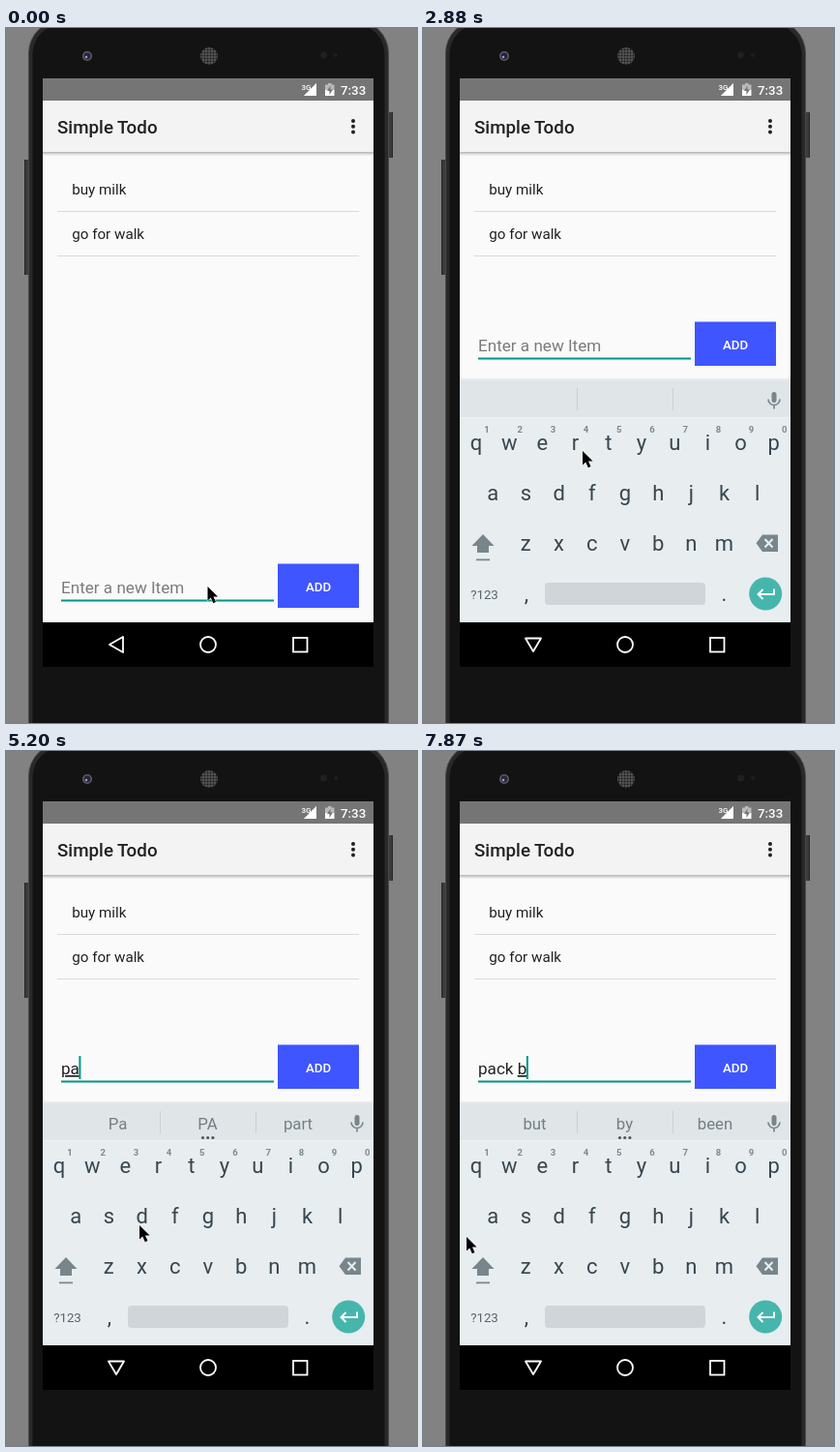
An HTML page for the animation above (8 s loop, 425x718 px).

```html
<!DOCTYPE html>
<html lang="en">
<head>
<meta charset="utf-8">
<title>Todo list</title>
<style>
  html, body { margin: 0; width: 100%; height: 100%; overflow: hidden; background: #828282; }
  svg { display: block; width: 100%; height: 100%; }
  text { font-family: Roboto, sans-serif; white-space: pre; }
  .mid { text-anchor: middle; }
  .medium { font-weight: 500; }
  .key { font-size: 22px; fill: #37474f; }
  .hint { font-size: 9.5px; font-weight: 700; fill: #7c898f; }
  .word { font-size: 16.8px; fill: #737f84; }
  .entry { font-size: 17.1px; fill: #212121; }
  #composing { text-decoration: underline; text-decoration-skip-ink: none; text-decoration-thickness: 1px; }
</style>
</head>
<body>
<svg viewBox="0 0 425 718" preserveAspectRatio="none">
  <defs>
    <linearGradient id="shade" x2="0" y2="1">
      <stop stop-color="#000" stop-opacity=".28"/>
      <stop offset="1" stop-color="#000" stop-opacity="0"/>
    </linearGradient>
    <pattern id="mesh" width="3" height="3" patternUnits="userSpaceOnUse">
      <rect width="3" height="3" fill="#555"/>
      <circle cx="1.5" cy="1.5" r="1" fill="#191919"/>
    </pattern>
    <filter id="soft" x="-20%" y="-20%" width="140%" height="140%">
      <feDropShadow dx="0" dy="1" stdDeviation="1.2" flood-opacity=".5"/>
    </filter>
  </defs>

  <!-- Phone body -->
  <rect width="425" height="718" fill="#828282"/>
  <path d="M19 136h5v119h-5zM395 87h5v47h-5z" fill="#3c3c3c"/>
  <path d="M19.5 136v119M399.5 87v47" stroke="#222"/>
  <rect x="23.5" y="-8" width="372" height="800" rx="34" fill="#292929" stroke="#484848"/>
  <rect x="27.5" y="-4" width="364" height="800" rx="31" fill="#131313"/>
  <circle cx="84" cy="29" r="5" fill="#5d5d62"/>
  <circle cx="84" cy="29" r="3.4" fill="#25253c"/>
  <circle cx="83" cy="30" r="1.3" fill="#9a9ad0"/>
  <circle cx="210" cy="29" r="9" fill="url(#mesh)"/>
  <circle cx="328.500" cy="28" r="3.5" fill="#202020"/>
  <circle cx="341" cy="28" r="2" fill="#202020"/>

  <!-- App screen -->
  <rect x="38" y="52" width="342" height="562" fill="#fafafa"/>
  <rect x="38" y="52" width="342" height="23" fill="#757575"/>
  <rect x="38" y="75" width="342" height="53" fill="#f3f3f3"/>
  <rect x="38" y="128" width="342" height="4" fill="url(#shade)"/>
  <g fill="#fff">
    <text x="305.500" y="63.500" font-size="8" class="medium">3G</text>
    <path d="M321 57v13h-13z" fill-opacity=".45"/>
    <path d="M316 62v8h-8z"/>
    <path d="M316 62l5-5v13h-5z"/>
    <path d="M330 58.500h3v-1.500h3.500v1.500h3v5.500h-9.500z" fill-opacity=".5"/>
    <path d="M330 64h9.500v6h-9.500z"/>
    <path d="M335.500 59.500l-3.500 5.500h2.500v4l3.500-5.500h-2.500z" fill="#757575"/>
    <text x="346" y="68.500" font-size="13.300" class="medium">7:33</text>
  </g>
  <text x="53" y="108.500" font-size="18.800" class="medium" fill="#212121">Simple Todo</text>
  <g fill="#212121">
    <circle cx="359" cy="96" r="2"/><circle cx="359" cy="101.700" r="2"/><circle cx="359" cy="107.400" r="2"/>
  </g>
  <g font-size="15.200" fill="#212121">
    <text x="68.200" y="172">buy milk</text>
    <text x="68.200" y="218">go for walk</text>
  </g>
  <path d="M53 189.500h312M53 235.500h312" stroke="#dadada"/>

  <g id="form">
    <text id="placeholder" class="entry" x="57" y="584" style="fill:#7b7b7b">Enter a new Item</text>
    <text id="entry" class="entry" x="57" y="584"><tspan id="done"></tspan><tspan id="composing"></tspan></text>
    <rect x="57" y="590.500" width="220" height="2" fill="#009688"/>
    <rect id="caret" y="565" width="2" height="24" fill="#009688"/>
    <rect x="281" y="553.500" width="84" height="45.500" fill="#3f55ff"/>
    <text x="323" y="581.500" font-size="13.300" class="mid medium" fill="#fff">ADD</text>
  </g>

  <rect x="38" y="614" width="342" height="46" fill="#000"/>

  <g id="keyboard">
    <rect x="38" y="362" width="342" height="3" fill="#000" opacity=".06"/>
    <rect x="38" y="364" width="342" height="250" fill="#e8edf0"/>
    <rect x="38" y="364" width="342" height="38" fill="#e0e5e8"/>
    <path d="M38 402.500h342" stroke="#f1f4f5"/>
    <path d="M159.500 372v23M258.500 372v23" stroke="#cad0d3"/>
    <g id="words">
      <text class="mid word" x="115.500" y="391"></text>
      <text class="mid word" x="208.500" y="391"></text>
      <text class="mid word" x="302" y="391"></text>
      <g id="more" fill="#4b575c">
        <circle cx="203.500" cy="399.500" r="1.600"/><circle cx="208.700" cy="399.500" r="1.600"/><circle cx="213.900" cy="399.500" r="1.600"/>
      </g>
    </g>
    <g fill="none" stroke="#78868c" stroke-width="1.700">
      <path d="M357 383.500a6 6 0 0 0 12 0M363 389.500v4"/>
      <rect x="360.500" y="376" width="5" height="11" rx="2.500" fill="#78868c" stroke="none"/>
    </g>
    <g id="letters"></g>
    <path d="M62 523l11.500 12h-5.500v7h-12v-7h-5.500zM55 548.500h14v1.800h-14z" fill="#78868c"/>
    <path d="M351 523.500h16v17.500h-16l-6.500-8.700z" fill="#78868c"/>
    <path d="M353.500 528l8 8.500M361.500 528l-8 8.500" stroke="#e8edf0" stroke-width="2"/>
    <text x="63.500" y="589.500" class="mid" font-size="13.300" fill="#56646a">?123</text>
    <text x="107" y="592" class="mid key">,</text>
    <text x="311.500" y="592" class="mid key">.</text>
    <rect id="space" x="126" y="573" width="166" height="23" rx="4"/>
    <circle cx="354.200" cy="584.500" r="17" fill="#46b6ac"/>
    <path d="M363 579.500v5.500h-16M351.500 580l-5 5 5 5" fill="none" stroke="#fff" stroke-width="1.900"/>
  </g>

  <g fill="none" stroke="#fff" stroke-width="1.800">
    <path id="back" stroke-linejoin="round"/>
    <circle cx="209" cy="637" r="8"/>
    <rect x="297" y="630" width="14.500" height="14.500"/>
  </g>

  <g id="popup">
    <rect x="-23" width="46" height="109" rx="2" fill="#cfd6d8" filter="url(#soft)"/>
    <text id="popupLetter" class="mid" y="39.500" font-size="32" fill="#37474f"></text>
    <path id="popupDots" d="M9 51.500h12" stroke="#7c898f" stroke-width="1.500" stroke-dasharray="2 2.500"/>
  </g>

  <path id="pointer" d="M0 0v14.500l3.300-3 2.500 5.700 2.700-1.200-2.500-5.500h4.600z" fill="#000" stroke="#fff" stroke-width="1" paint-order="stroke"/>
</svg>
<script>
const LOOP = 8000, KEYBOARD_AT = 1800, BLINK = 510, KEY_STEP = 34.2;
const $ = id => document.getElementById(id);
const rows = [["qwertyuiop", 55, 436], ["asdfghjkl", 72.2, 488], ["zxcvbnm", 106.3, 540]];
const keys = {};

function addText(parent, className, x, y, content) {
  const node = document.createElementNS("http://www.w3.org/2000/svg", "text");
  node.setAttribute("class", "mid " + className);
  node.setAttribute("x", x);
  node.setAttribute("y", y);
  node.textContent = content;
  parent.append(node);
}

rows.forEach(([letters, left, baseline], row) => [...letters].forEach((letter, i) => {
  const x = left + KEY_STEP * i;
  keys[letter] = { x, y: baseline };
  addText($("letters"), "key", x, baseline, letter);
  if (row === 0) addText($("letters"), "hint", x + 11, 418, (i + 1) % 10);
}));

// [time, x, y] of the pointer tip
const path = [
  [90, 208.5, 577], [300, 185, 547], [540, 155, 566], [720, 155, 566], [810, 153.5, 569],
  [1960, 153.5, 569], [2520, 152, 468], [2610, 152, 466], [2880, 165, 437], [3330, 202, 463],
  [3860, 358, 431], [4220, 358, 431], [4720, 70, 483], [4970, 70, 483], [5200, 138, 490],
  [5600, 172, 528], [5920, 172, 528], [6400, 311, 483], [6640, 311, 483], [6880, 226, 569],
  [7330, 226, 569], [7510, 241, 534], [7690, 241, 534], [7870, 45, 502]
];

// key, pressed at, released at
const presses = [
  ["p", 4040, 4220], ["a", 4790, 4970], ["c", 5740, 5920],
  ["k", 6440, 6640], [" ", 7150, 7330], ["b", 7510, 7690]
];

// from, finished text, text being composed, suggestions
const states = [
  [240, "", "", []],
  [4220, "", "p", ["P", "PM", "per"]],
  [4970, "", "pa", ["Pa", "PA", "part"]],
  [5920, "", "pac", ["pack", "PAC", "pace"]],
  [6640, "", "pack", ["package", "lack", "packed"]],
  [7330, "pack ", "", ["up", "of", "and"]],
  [7690, "pack ", "b", ["but", "by", "been"]]
];

const show = (id, visible) => $(id).setAttribute("visibility", visible ? "visible" : "hidden");
const move = (id, x, y) => $(id).setAttribute("transform", `translate(${x} ${y})`);

function pointerAt(t) {
  const next = path.findIndex(point => point[0] > t);
  if (next === 0) return path[0].slice(1);
  if (next < 0) return path.at(-1).slice(1);
  const [t0, x0, y0] = path[next - 1], [t1, x1, y1] = path[next];
  const p = (t - t0) / (t1 - t0), eased = p * p * (3 - 2 * p);
  return [x0 + (x1 - x0) * eased, y0 + (y1 - y0) * eased];
}

function drawEntry(t) {
  const [since, done, composing, words] = states.findLast(state => state[0] <= t) || states[0];
  $("done").textContent = done;
  $("composing").textContent = composing;
  show("placeholder", !done && !composing);
  $("caret").setAttribute("x", 57 + (done || composing ? $("entry").getComputedTextLength() - 0.5 : 0));
  show("caret", Math.floor((t - since) / BLINK) % 2 === 0);
  document.querySelectorAll(".word").forEach((node, i) => node.textContent = words[i] || "");
  show("more", words.length);
}

function drawKeyboard(t) {
  const open = t >= KEYBOARD_AT;
  const left = 1 - Math.min(1, Math.max(0, (t - KEYBOARD_AT) / 180));
  move("form", 0, open ? -250 : 0);
  move("keyboard", 0, 16 * left * left);
  $("keyboard").setAttribute("opacity", 1 - left ** 3);
  $("back").setAttribute("d", open ? "M106 630.500h16l-8 13.500z" : "M107 637l14-8v16z");

  const [letter] = presses.find(([, down, up]) => t >= down && t < up) || [];
  const key = keys[letter];
  $("space").setAttribute("fill", letter === " " ? "#bcc4c8" : "#cfd5d8");
  show("popup", key);
  if (key) {
    move("popup", Math.min(key.x, 354), key.y - 95);
    $("popupLetter").textContent = letter;
  }
  show("popupDots", key && "pac".includes(letter));
}

function frame(now) {
  const t = now % LOOP;
  drawEntry(t);
  drawKeyboard(t);
  move("pointer", ...pointerAt(t));
  requestAnimationFrame(frame);
}
requestAnimationFrame(frame);
</script>
</body>
</html>
```
